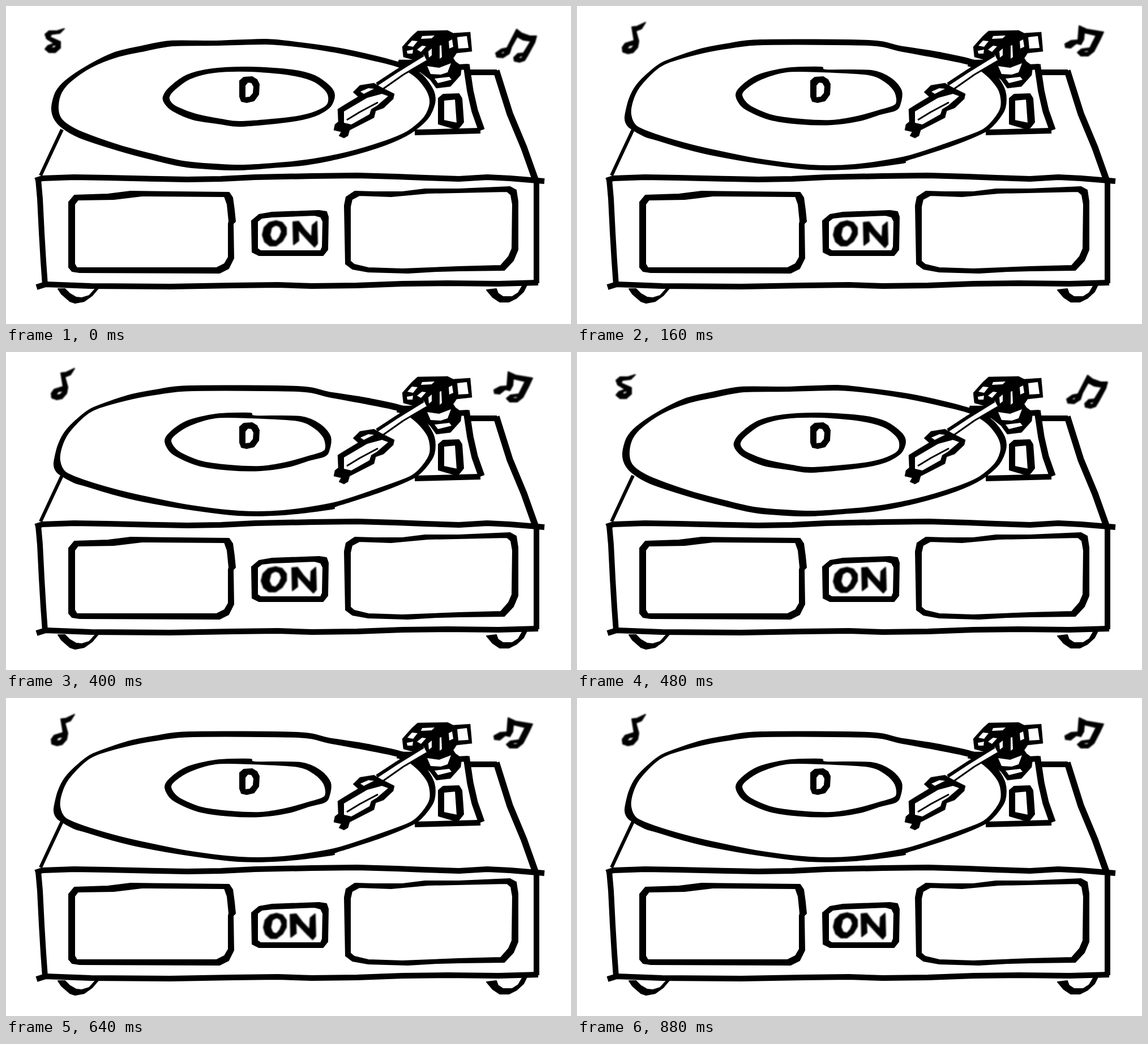
Recreate the animation shown at these times as an HTML page. Size 998x561 px, loop 960 ms.

```html
<!DOCTYPE html>
<html lang="en">
<head>
<meta charset="utf-8">
<title>Record player</title>
<style>
  html, body { margin: 0; width: 100%; height: 100%; overflow: hidden; background: #fff; }
  svg { display: block; width: 998px; height: 561px; }
  path { fill: #000; fill-rule: evenodd; stroke: #000; stroke-width: 2; stroke-linejoin: round; }
  .line path { fill: none; stroke-width: 10; }
  .line .thin { stroke-width: 3; }
  .line .mid { stroke-width: 6; }
  .line .thick { stroke-width: 11.5; }
  .arm path { stroke-width: .5; }
  .arm .white path { fill: #fff; stroke: none; }
  .soft { filter: blur(1px); }

  /* three drawings take turns, 80 ms each */
  .pose { animation: turn 240ms step-end infinite; }
  .second { animation-delay: -160ms; }
  .third { animation-delay: -80ms; }
  @keyframes turn {
    0% { visibility: visible; }
    33.3333%, 100% { visibility: hidden; }
  }

  .o, .n { transform-box: fill-box; transform-origin: center; animation: 960ms step-end infinite; }
  .o { animation-name: wobble-o; }
  .n { animation-name: wobble-n; }
  @keyframes wobble-o {
    0% { transform: none; }
    25% { transform: translate(-1px, 0); }
    33.3333% { transform: translate(-2px, 0) rotate(-5deg); }
    41.6667% { transform: translate(-1px, 0) scale(1.05, 1); }
    50% { transform: translate(0, 1px); }
    66.6667% { transform: translate(1px, 1px) scale(.96, 1); }
    75% { transform: none; }
  }
  @keyframes wobble-n {
    0% { transform: none; }
    16.6667% { transform: translate(-1px, 1px); }
    33.3333% { transform: translate(-2px, 0); }
    50% { transform: translate(-4px, 0); }
    66.6667% { transform: translate(-4px, 1px) scale(1.04, 1); }
    75% { transform: translate(-5px, 0); }
  }
</style>
</head>
<body>
<svg viewBox="0 0 998 561">
  <!-- cabinet -->
  <g class="line">
    <path class="mid" d="M99 218L82 254L61 299"/>
    <path d="M52 308L64 304L120 302L180 303L270 305L320 306L380 305L440 302L540 300L620 299L690 301L740 303L800 305L850 302L890 304L951 309"/>
    <path d="M57 306L60 340L63 400L66 450L69 492"/>
    <path d="M54 496L70 491L150 494L290 495L400 493L480 492L540 494L620 493L700 490L780 489L870 490L940 488"/>
    <path d="M937 306V489"/>
    <path d="M820 117H867"/>
    <path class="thick" d="M866 114L890 190L915 250L936 309"/>
    <path d="M722 223L838 220"/>
    <path class="thick" d="M813 103L820 150L828 185L840 219"/>
    <path d="M797 108L816 107"/>
  </g>
  <path d="M92 499L98 508L113 521L122 524L138 521L152 511L163 498L157 500L147 511L134 515L124 514L112 507L104 499Z"/>
  <path d="M849 501L860 514L872 522L888 522L902 515L914 504L920 492L912 494L905 506L894 513L878 513L869 507L866 499Z"/>
  <path d="M111 346L121 334L180 332L220 327L394 329L400 338L403 360L405 380L401 384L402 445L393 463L377 471L130 470L117 468L111 461Z
    M121 350L127 342L190 341L240 335L386 336L391 350L394 380L393 384V443L386 455L372 462H125L121 455Z"/>
  <path d="M598 352L601 337L616 327L650 328L700 328L740 323L800 323L890 319L901 325L904 345V430L896 449L880 466L800 467L760 468L710 471L640 469L612 464L600 455Z
    M608 354L611 341L624 334L680 336L745 330L885 327L892 333L895 350L894 428L888 442L874 458L800 460L700 464L640 462L615 456L608 450Z"/>
  <path d="M434 379L447 368L470 364L553 361L566 363L569 372L568 430L560 440H447L435 434Z
    M444 380L452 374L470 372L545 369L556 372L560 380L559 425L556 432H450L444 428Z"/>
  <path d="M764 163L772 156L800 155L805 163L808 205L801 214L795 217L764 208Z
    M773 166L794 164L797 207L773 202Z"/>

  <!-- power label -->
  <g class="soft">
    <path class="o" d="M453 404L456 391L465 382L477 379L488 382L495 391L495 403L488 415L477 423L466 423L457 416Z
      M466 404L470 413L477 415L483 408L487 398L484 390L477 386L469 391Z"/>
    <path class="n" d="M507 381L517 380L528 395L540 408L541 387L549 380L550 419L545 425L536 416L516 394L517 414L508 421Z"/>
  </g>

  <!-- spindle -->
  <path d="M413 132L420 126L435 125L443 130L447 138L446 156L438 167L425 170L416 168L413 160Z
    M422 140L427 134L434 135L438 142L437 154L431 161L422 162Z"/>

  <!-- record and notes -->
  <g class="pose">
    <path class="round" d="M81 178L88 152L105 132L140 108L190 83L240 71L290 62L370 62L460 59L520 65L590 75L650 88L700 102L735 122L755 150L757 172L745 198L715 224L670 245L600 266L530 280L470 285L405 289L320 284L260 271L200 255L130 232L100 215L85 198Z
      M92 175L98 152L115 132L150 108L195 90L245 79L295 70L370 69L460 67L520 72L590 83L650 96L695 108L725 126L744 150L749 172L739 196L710 221L665 240L600 259L530 272L470 278L405 281L320 275L260 262L200 246L135 223L107 208L95 195Z"/>
    <path class="round" d="M278 160L290 143L320 122L365 111L430 108L505 113L545 123L572 142L580 158L572 178L545 194L500 204L415 212L380 208L330 200L295 185L281 172Z
      M288 160L298 147L325 128L368 117L430 115L500 121L540 131L562 146L570 160L566 176L540 189L500 197L415 204L380 200L335 191L303 179L291 170Z"/>
    <g class="soft">
      <path d="M103 40L95 48L80 50L78 55L96 63L96 74L87 82L76 82L69 76L74 70L85 66L72 58L69 50L76 44L90 44Z
        M80 75L87 73L89 68L82 70Z"/>
      <path d="M902 41L911 48L925 53L937 53L934 64L921 88L916 96L907 99L898 97L897 91L904 84L914 83L927 62L914 60L903 54L893 72L889 84L878 91L867 90L865 83L875 76L885 74Z
        M873 85L879 84L883 79L876 81ZM905 93L911 92L914 87L907 89Z"/>
    </g>
  </g>
  <g class="pose second">
    <path class="round" d="M79 185L84 168L98 142L125 115L168 97L248 79L300 70L365 58L495 59L540 68L600 82L690 96L725 112L750 135L758 160L748 190L725 220L690 236L640 257L570 277L500 287L395 288L320 277L200 255L150 237L105 217L84 202Z
      M90 185L95 169L108 146L133 120L174 103L250 87L305 77L370 65L495 67L540 76L600 90L685 104L718 120L742 140L751 162L742 188L718 217L685 231L635 251L570 271L500 280L398 280L320 269L205 246L155 229L112 209L94 196Z"/>
    <path class="round" d="M277 160L290 144L320 125L350 114L410 109L440 114L515 113L545 126L572 140L577 155L573 178L555 192L520 203L470 210L365 208L320 194L290 178Z
      M288 160L298 148L325 131L355 120L410 117L510 121L540 134L562 146L568 157L564 175L548 187L515 196L470 203L370 201L325 186L298 172Z"/>
    <g class="soft">
      <path d="M111 30L118 31L132 38L124 45L117 45L118 65L111 73L99 79L84 79L81 73L88 66L100 62L110 63Z
        M91 73L98 73L107 67L100 67Z"/>
      <path d="M886 36L928 35L929 79L923 86L911 89L903 86L904 79L912 74L921 74V45H893L892 71L888 79L878 84L865 84L863 77L872 69L885 67Z
        M871 79L878 78L883 73L876 74ZM910 83L916 83L920 79L914 79Z"/>
    </g>
  </g>
  <g class="pose third">
    <path class="round" d="M85 195L92 165L105 140L130 115L155 98L215 77L265 67L325 60L515 61L570 71L640 82L705 97L738 120L756 150L756 180L740 205L720 222L660 247L583 272L575 277L490 287L410 288L320 277L240 263L190 251L140 236L120 230L95 216L87 207Z
      M95 192L98 168L110 143L135 116L160 100L220 83L270 74L330 68L515 69L570 79L640 92L698 105L727 125L746 150L749 178L735 202L714 220L655 242L580 266L490 280L412 281L320 270L240 254L190 242L140 227L105 212Z"/>
    <path class="round" d="M281 158L290 142L320 122L370 110L430 108L440 113L520 114L555 128L573 150L570 175L562 184L535 191L500 202L450 209L395 208L340 200L295 180Z
      M291 158L298 146L325 129L370 116L430 116L515 121L545 134L562 152L563 174L535 184L495 195L450 202L395 200L345 193L305 176Z"/>
    <g class="soft">
      <path d="M97 37L106 36L121 29L114 40L104 44L109 62L107 73L99 82L90 84L81 81L80 73L85 66L101 61Z
        M88 76L96 75L102 68L92 70Z"/>
      <path d="M887 35L900 41L930 46L923 61L913 80L903 88L890 88L884 82L891 76L906 74L917 52L896 47L895 59L890 68L882 66L872 74L863 73L862 67L873 61L885 60Z
        M893 82L902 82L906 78L897 79Z"/>
    </g>
  </g>

  <!-- tonearm -->
  <g class="arm">
    <path d="M700 72L717 53L727 44L780 43L790 48L820 46L823 80L796 83L790 92L794 98L805 106L803 122L785 142L760 145L749 130L732 117L690 106L694 95L720 95L702 90Z"/>
    <g class="white">
      <path d="M797 55L814 53L817 74L799 75Z"/>
      <path d="M735 53L757 52L752 57L733 58Z"/>
      <path d="M709 70L717 61L727 62L719 72Z"/>
      <path d="M708 79L719 77L718 84L709 84Z"/>
      <path d="M726 77L735 70L742 71L733 81Z"/>
      <path d="M746 80L752 75L752 87L747 91Z"/>
      <path d="M766 70L769 69L770 90L766 93Z"/>
      <path d="M782 62L788 59L790 72L783 75Z"/>
      <path d="M744 106L765 109L786 101L780 117L768 121L750 120Z"/>
      <path d="M757 128L783 125L787 130L763 136Z"/>
      <path d="M738 86L743 96L702 120L665 147L655 136L690 114Z"/>
    </g>
    <path d="M613 152L625 140L650 136L662 143L686 155L684 164L667 180L653 185L650 197L607 219L604 229L597 233L588 229L592 222L579 219L581 209L587 204L586 182L597 175L622 160Z"/>
    <g class="white">
      <path d="M597 186L638 162L664 155L675 159L655 176L645 182L642 191L610 209L597 206Z"/>
      <path d="M626 151L640 145L650 146L632 155Z"/>
    </g>
  </g>
  <g class="line">
    <path class="mid" d="M737 86L690 115L655 138"/>
    <path class="thin" d="M743 97L702 121L665 147M602 201L625 187L657 170"/>
  </g>
</svg>
<script>
  // Turn a closed outline into a smooth curve through its corners.
  function smooth(outline) {
    const n = outline.match(/\d+/g).map(Number);
    const size = n.length / 2;
    const at = i => [0, 1].map(k => n[(i + size) % size * 2 + k]);
    const handle = (p, from, to) => p.map((v, k) => v + (to[k] - from[k]) / 7);
    let d = "M" + at(0);
    for (let i = 0; i < size; i++) {
      const [a, b, c, e] = [at(i - 1), at(i), at(i + 1), at(i + 2)];
      d += "C" + [handle(b, a, c), handle(c, e, b), c].join(" ");
    }
    return d + "Z";
  }
  for (const ring of document.querySelectorAll(".round")) {
    const parts = ring.getAttribute("d").split("Z").filter(s => s.trim());
    ring.setAttribute("d", parts.map(smooth).join(""));
  }
</script>
</body>
</html>
```
